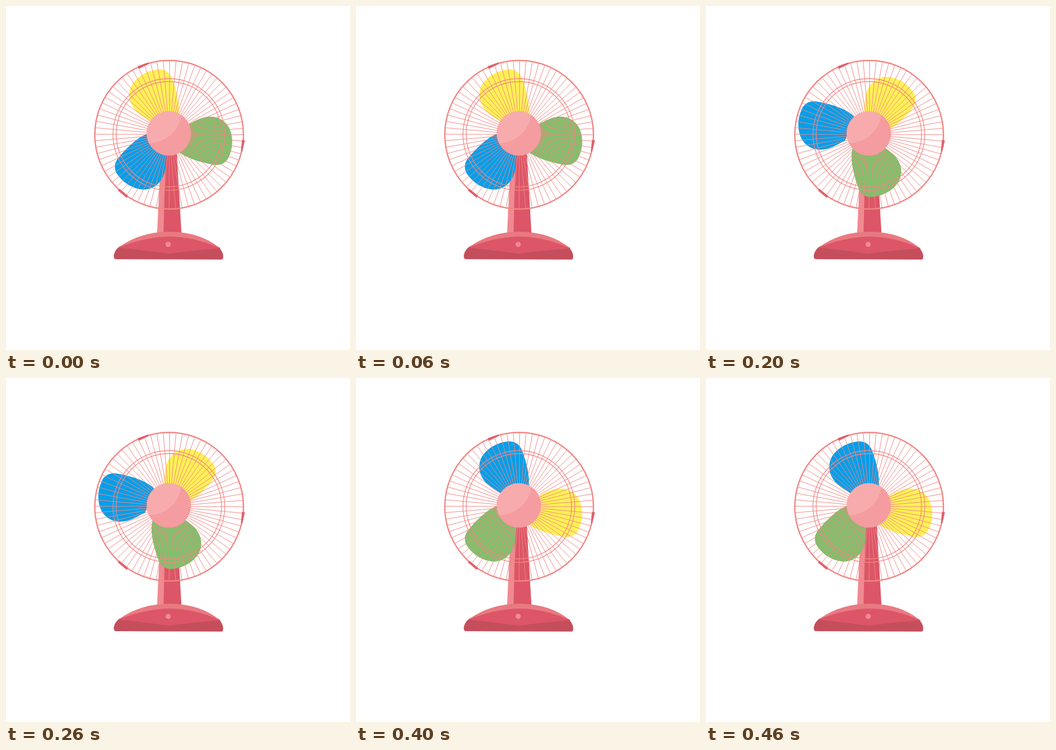
Animation, 640 px wide and 640 px high, one loop 500 ms. Source, as an HTML page:

```html
<!DOCTYPE html>
<html lang="en">
<head>
<meta charset="utf-8">
<title>Desk fan</title>
<style>
  html, body { margin: 0; width: 100%; height: 100%; overflow: hidden; background: #fff; }
  svg { display: block; width: 640px; height: 640px; }
</style>
</head>
<body>
<svg viewBox="0 0 640 640">
  <defs>
    <path id="blade" d="M318 212C326 199 321 166 308.500 133.500C303.500 122 294 117 283 118
      C262 120 244 131 234.500 146C225.500 162 228.500 180 241 194C249 203 259 208 272 217Z"/>
  </defs>

  <g id="stand">
    <path fill="#dc5667" d="M296 270H317.500L326.500 424H292Z"/>
    <path fill="#f08a92" d="M288.500 270H297L293 424H281Z"/>
  </g>

  <g id="base">
    <path fill="#c54e5c" d="M203 471Q200 469 200.500 464Q202 454 212 447Q303 430 395 448
      Q403 456 404 464Q404.500 470 402 471.700Z"/>
    <path fill="#dc5667" d="M208 449.500Q250 426 303 426Q356 426 400 451Q350 454 303 461Q256 454 208 449.500Z"/>
    <path fill="#e97a81" d="M209 449.500Q249 420 304 420Q362 420.500 398 450.500Q350 429 303 429Q258 430 209 449.500Z"/>
    <circle cx="301.700" cy="443.500" r="4.800" fill="#f08b92"/>
  </g>

  <g id="blades"></g>

  <g id="cage" fill="none" stroke="#f28684">
    <path id="spokes" stroke-width="1"/>
    <circle cx="303" cy="239" r="104" stroke-width="1.300"/>
    <circle cx="303" cy="238.500" r="98" stroke-width="1.300"/>
    <circle cx="303.500" cy="239.500" r="138.300" stroke-width="2.500"/>
  </g>
  <path id="clips" fill="#e0606c" d="M245 112L265 105L265.500 108L247 117Z
    M211 340L227 353L224.500 357L208 343Z M439 249L444.500 250L439.500 271L437 270Z"/>

  <g id="hub">
    <circle cx="303" cy="237" r="41.300" fill="#f49c9f"/>
    <path fill="#f8abad" d="M326 202.700C321 235 296 254 266 255.300A41.300 41.300 0 0 1 326 202.700Z"/>
  </g>
</svg>

<script>
const STEP = 100, STEPS = 5;
const COLORS = ['#fff056', '#82bf6b', '#079ee8'];
const blades = document.getElementById('blades');

// Three copies of one blade around the rotor axis
const parts = COLORS.map((_, i) => {
  const blade = document.createElementNS('http://www.w3.org/2000/svg', 'use');
  blade.setAttribute('href', '#blade');
  blade.setAttribute('transform', `rotate(${i * 120} 301.6 237.6)`);
  return blades.appendChild(blade);
});

// Spokes every five degrees, very slightly tilted
let d = '';
for (let deg = 0.2; deg < 360; deg += 5) {
  const a = deg * Math.PI / 180, c = Math.cos(a), s = Math.sin(a);
  d += `M${304 + 30 * c} ${239 + 30 * s}L${304 + 138 * c} ${239 + 138 * s}`;
}
document.getElementById('spokes').setAttribute('d', d);

// Quarter turns back with shifted colours read as a 30 degree spin forward
function pose(k) {
  blades.setAttribute('transform', `rotate(${-90 * k} 296.3 236.6)`);
  parts.forEach((blade, i) => blade.setAttribute('fill', COLORS[(i + 2 * k) % 3]));
}

const start = performance.now();
function tick() {
  pose(Math.floor((performance.now() - start) / STEP) % STEPS);
  requestAnimationFrame(tick);
}
tick();
</script>
</body>
</html>
```
